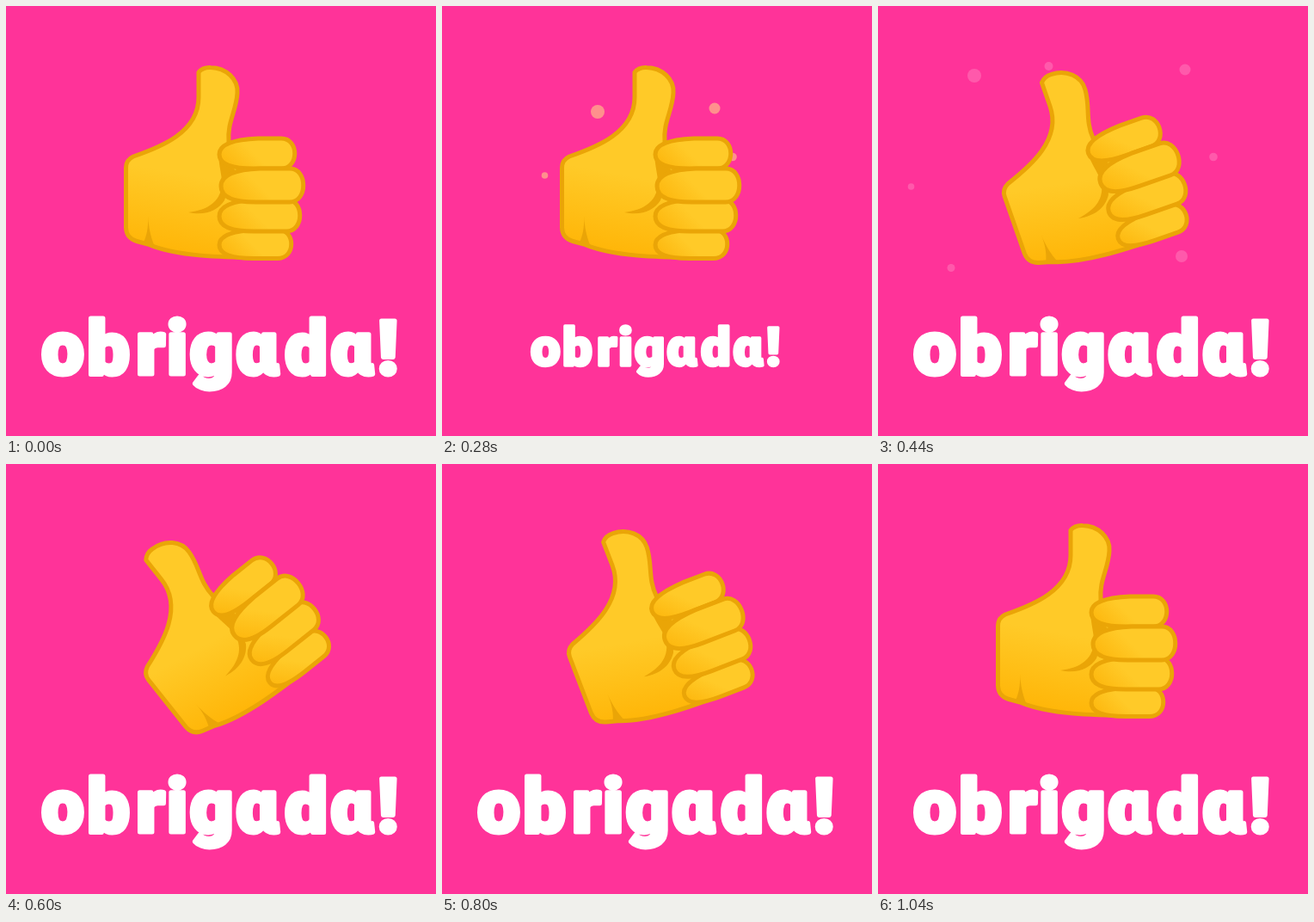
Recreate the animation shown at these times as an HTML page. Size 500x500 px, loop 2000 ms.

```html
<!DOCTYPE html>
<html lang="pt">
<head>
<meta charset="utf-8">
<title>obrigada!</title>
<style>
  html, body { margin: 0; width: 100%; height: 100%; overflow: hidden; background: #f39; }
  svg { display: block; width: 100%; height: 100%; }
  text {
    font: 900 88px Roboto, "Noto Sans", "DejaVu Sans", sans-serif;
    text-anchor: middle; fill: #fff; stroke: #fff; stroke-width: 5; stroke-linejoin: round;
  }
  .skin { stroke: #eaa507; stroke-width: 5; stroke-linejoin: round; }
  .shade { fill: #eaa507; }
</style>
</head>
<body>
<svg viewBox="0 0 500 500">
  <defs>
    <linearGradient id="palm" x1=".6" y1="0" x2=".45" y2="1">
      <stop offset=".58" stop-color="#ffca28"/>
      <stop offset="1" stop-color="#ffb507"/>
    </linearGradient>
    <linearGradient id="finger" x1="0" y1=".8" x2="1" y2=".4">
      <stop offset="0" stop-color="#fdb60c"/>
      <stop offset=".5" stop-color="#ffca28"/>
    </linearGradient>
  </defs>
  <g id="dots"></g>
  <g id="hand">
    <path class="skin" fill="url(#palm)" d="M224 77Q229 71 238 71.5C256 72 270 85 269 101
      C268 122 257 135 259 158L300 165L318 293C270 292 205 294 165 277L152 273.5
      Q140 270 139.5 258V188Q139.5 179 148 175C180 164 224 147 224 106Z"/>
    <path class="shade" d="M247 172C248 190 252 200 251 210C248 227 236 237 212 240
      C232 244 246 238 254 226L266 190Z"/>
    <path class="shade" d="M165 244C166 258 163 268 160 275L173 280C168 268 166 258 165 244Z"/>
    <g id="fingers" class="skin" fill="url(#finger)"></g>
  </g>
  <!-- Latin alpha gives the single-storey a of the lettering -->
  <text id="word" y="428" x="66 119 168 199 239 293 349 403 444" aria-label="obrigada!">obrigɑdɑ!</text>
</svg>
<script>
const $ = id => document.getElementById(id);
const clamp = v => Math.max(0, Math.min(1, v));
const CX = 243, CY = 182, PEAK = 38.5;

const make = (tag, parent, attrs) => {
  const el = document.createElementNS("http://www.w3.org/2000/svg", tag);
  for (const key in attrs) el.setAttribute(key, attrs[key]);
  return parent.appendChild(el);
};

// left, right, top, bottom
[[248, 336, 154, 189], [248, 332, 260, 293.5], [248, 342, 225, 262], [250, 346, 189, 228]]
  .forEach(([l, r, t, b]) => {
    const m = (t + b) / 2 + 1;
    make("path", $("fingers"), {
      d: `M${l} ${m}C${l} ${t + 5} ${l + 22} ${t + 1} ${l + 45} ${t}H${r - 16}` +
         `C${r + 5} ${t} ${r + 5} ${b} ${r - 16} ${b}H${l + 40}C${l + 17} ${b} ${l} ${b - 4} ${l} ${m}Z`
    });
  });

// x and y at 440 ms, travel per 160 ms, radius
const dots = [
  [112, 81, -69, -42, 8], [357, 74, 40, -45, 6.5], [38.5, 210, -81, 13, 3.8],
  [390, 175.5, 52, 0, 4.8], [198.5, 70, -27, -58, 5], [85, 304.5, -75, 39, 4.5], [353, 291, 53, 31, 7]
].map(([x, y, dx, dy, r]) => ({ x, y, dx, dy, el: make("circle", $("dots"), { r }) }));

function angle(t) {
  if (t < 280) return -40 * (1 - t / 280);
  if (t < 600) return -PEAK * (t - 280) / 320;
  return -PEAK * clamp((1040 - t) / 440);
}

function draw(t) {
  const grow = clamp(0.07 + 0.93 * t / 280);
  $("hand").setAttribute("transform",
    `translate(${CX} ${CY}) rotate(${angle(t)}) scale(${grow}) translate(${-CX} ${-CY})`);
  $("word").setAttribute("transform",
    `translate(247 396) scale(${clamp(t / 400)}) translate(-247 -396)`);

  const steps = (Math.max(t, 120) - 440) / 160;
  const out = clamp(t / 120);
  const blue = Math.min(255, 44 + 0.56 * Math.max(0, t - 120));
  $("dots").setAttribute("fill", `rgb(255 200 ${blue})`);
  $("dots").setAttribute("opacity", clamp(1 - (t - 120) / 430));
  for (const { x, y, dx, dy, el } of dots) {
    el.setAttribute("cx", CX + (x + dx * steps - CX) * out);
    el.setAttribute("cy", CY + (y + dy * steps - CY) * out);
  }
}

function tick(now) {
  const t = Math.floor(now % 2000 / 40) * 40;
  draw(t || 2000); // the loop opens on the resting pose
  requestAnimationFrame(tick);
}
draw(2000);
requestAnimationFrame(tick);
</script>
</body>
</html>
```
